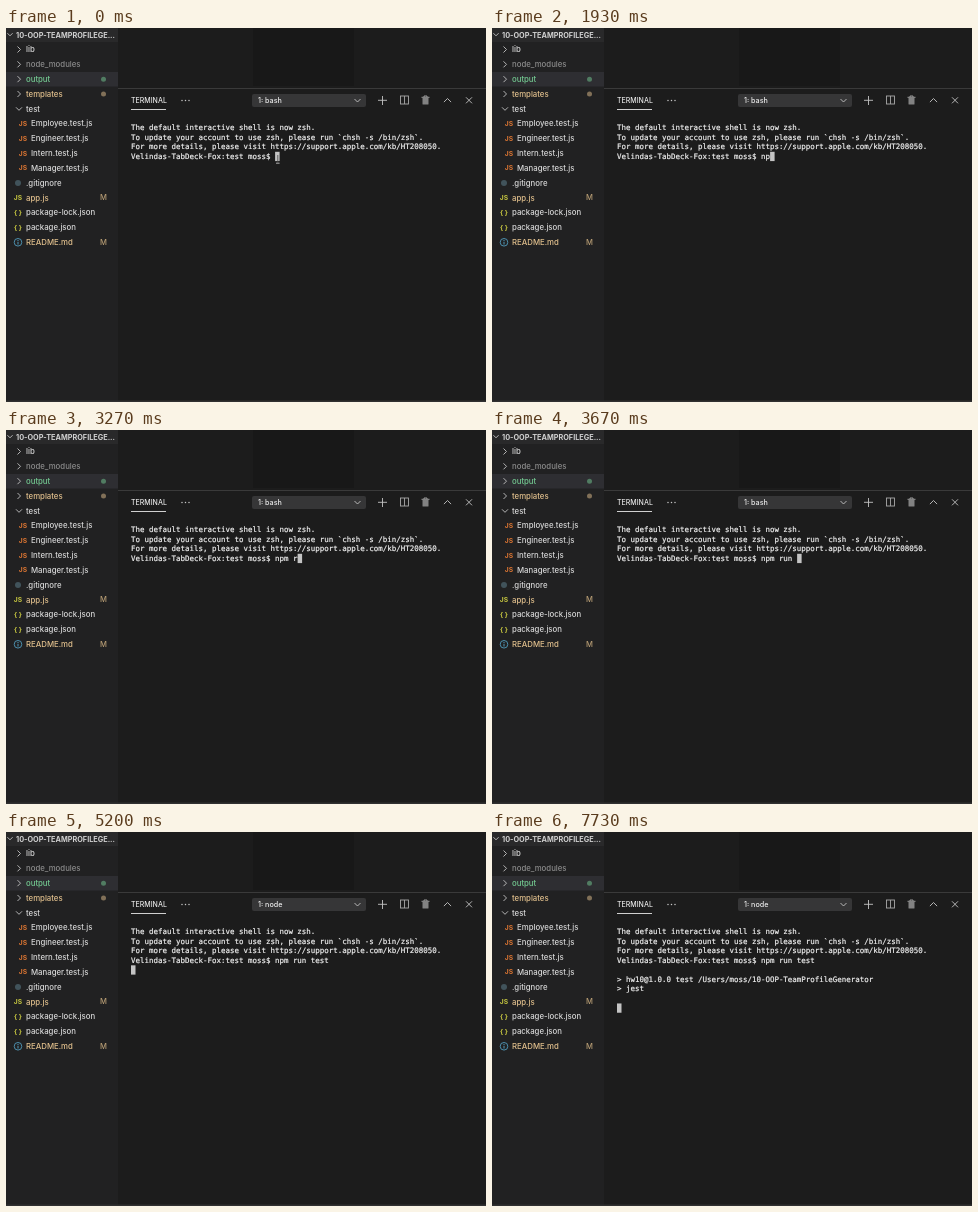
Recreate the animation shown at these times as an HTML page with a canvas. Size 480 by 374 pixels, loop 8 s.

```html
<!DOCTYPE html>
<html lang="en">
<head>
<meta charset="utf-8">
<title>Editor terminal</title>
<style>
html, body { margin: 0; width: 100%; height: 100%; overflow: hidden; background: #1c1c1c; }
canvas { display: block; width: 480px; height: 374px; }
</style>
</head>
<body>
<canvas id="stage" width="480" height="374"></canvas>
<script>
const ctx = document.getElementById('stage').getContext('2d');
const LOOP = 8000;
const UI = 'Inter, sans-serif';
const MONO = '7.48px "DejaVu Sans Mono", monospace';
const CELL = 4.503, LINE = 9.53, TERM_X = 125, TERM_Y = 95.2;

const GREEN = '#73c991', SAND = '#e2c08d', ORANGE = '#e37933', YELLOW = '#cbcb41';
const PLAIN = '#d8d8d8', GREY = '#8c8c8c';

const COMMAND = 'npm run test';
const KEY_TIMES = [1270, 1870, 2270, 3000, 3270, 3470, 3530, 3670, 3870, 4070, 4270, 4330];
const ENTER = 5130, SWITCH = 5200, OUTPUT = 6070;
const BANNER = [
  'The default interactive shell is now zsh.',
  'To update your account to use zsh, please run `chsh -s /bin/zsh`.',
  'For more details, please visit https://support.apple.com/kb/HT208050.'
];
const PROMPT = 'Velindas-TabDeck-Fox:test moss$ ';
const RESULT = ['> hw10@1.0.0 test /Users/moss/10-OOP-TeamProfileGenerator', '> jest'];

// name, colour, icon, icon colour, status mark, indent
const FILES = [
  ['lib', PLAIN, 'closed'],
  ['node_modules', GREY, 'closed'],
  ['output', GREEN, 'closed', '', 'dot'],
  ['templates', SAND, 'closed', '', 'dot'],
  ['test', PLAIN, 'open'],
  ...['Employee', 'Engineer', 'Intern', 'Manager'].map(n => [n + '.test.js', PLAIN, 'JS', ORANGE, '', 5]),
  ['.gitignore', PLAIN, 'disc', '#41535b'],
  ['app.js', SAND, 'JS', YELLOW, 'M'],
  ['package-lock.json', PLAIN, '{ }', YELLOW],
  ['package.json', PLAIN, '{ }', YELLOW],
  ['README.md', SAND, 'info', '#519aba', 'M']
];

function rect(x, y, w, h, color, radius = 0) {
  ctx.fillStyle = color;
  ctx.beginPath();
  ctx.roundRect(x, y, w, h, radius);
  ctx.fill();
}

function text(str, x, y, color, font) {
  ctx.font = font;
  ctx.fillStyle = color;
  ctx.fillText(str, x, y);
}

function disc(x, y, r, color) {
  ctx.fillStyle = color;
  ctx.beginPath();
  ctx.arc(x, y, r, 0, Math.PI * 2);
  ctx.fill();
}

function line(points, color, width = 0.9) {
  ctx.strokeStyle = color;
  ctx.lineWidth = width;
  ctx.beginPath();
  points.forEach(([x, y]) => ctx.lineTo(x, y));
  ctx.stroke();
}

function chevron(x, y, size, turn, color = '#c5c5c5') {
  ctx.save();
  ctx.translate(x, y);
  ctx.rotate(turn * Math.PI / 2);
  line([[-size / 2, -size], [size / 2, 0], [-size / 2, size]], color);
  ctx.restore();
}

function fileIcon(icon, color, x, y) {
  if (icon === 'closed') chevron(x + 1, y, 3, 0);
  else if (icon === 'open') chevron(x + 1, y, 3, 1);
  else if (icon === 'disc') disc(x, y, 3, color);
  else if (icon === 'info') {
    ctx.strokeStyle = color;
    ctx.lineWidth = 0.9;
    ctx.beginPath();
    ctx.arc(x, y, 3.8, 0, Math.PI * 2);
    ctx.stroke();
    rect(x - 0.5, y - 0.6, 1, 2.8, color);
    rect(x - 0.5, y - 2.2, 1, 1, color);
  } else {
    ctx.textAlign = 'center';
    text(icon, x, y + 2.3, color, `700 6.7px ${UI}`);
    ctx.textAlign = 'left';
  }
}

function drawSidebar() {
  rect(0, 0, 112, 374, '#212122');
  rect(0, 0, 112, 14, '#29292a');
  rect(0, 44, 112, 14.5, '#2e2e32');
  chevron(4, 6.5, 2.6, 1);
  text('10-OOP-TEAMPROFILEGE...', 10, 9.6, '#d0d0d0', `700 7.3px ${UI}`);

  FILES.forEach(([name, color, icon, iconColor, mark, indent = 0], i) => {
    const y = 21.5 + 14.83 * i;
    fileIcon(icon, iconColor, 12 + indent, y);
    text(name, 20 + indent, y + 2.8, color, `500 7.8px ${UI}`);
    if (mark === 'dot') {
      ctx.globalAlpha = 0.5;
      disc(97.5, y, 2.5, color);
      ctx.globalAlpha = 1;
    } else if (mark) text(mark, 94, y + 2.6, '#b59b73', `500 7.6px ${UI}`);
  });
}

function drawPanelBar(shell) {
  const icon = '#c5c5c5', soft = '#a8a8a8';
  rect(112, 60, 368, 1, '#3a3a3a');
  text('TERMINAL', 125, 75.2, '#e7e7e7', `500 7px ${UI}`);
  rect(125, 81, 35, 1, '#d0d0d0');
  [176, 179.5, 183].forEach(x => disc(x, 72.5, 0.75, icon));

  rect(246, 66, 114, 13, '#363637', 2);
  text('1: ' + shell, 252, 75.1, '#eeeeee', `500 7.2px ${UI}`);
  chevron(351.5, 72.5, 3, 1);

  line([[372, 72.3], [381, 72.3]], icon);
  line([[376.5, 68], [376.5, 77]], icon);

  ctx.strokeStyle = soft;
  ctx.lineWidth = 0.9;
  ctx.strokeRect(394.5, 68, 8, 8);
  line([[398.5, 68], [398.5, 76]], soft);

  line([[415.5, 69.3], [423.5, 69.3]], soft);
  line([[418, 69.3], [418, 68], [421, 68], [421, 69.3]], soft);
  rect(416.5, 69.5, 6, 7, '#828282', 0.5);

  chevron(441.5, 72.3, 3.6, -1);
  line([[460, 69.3], [466, 75.3]], icon);
  line([[466, 69.3], [460, 75.3]], icon);
}

function termLine(str, row) {
  const y = TERM_Y + row * LINE + 7;
  text(str, TERM_X, y, '#f0f0f0', MONO);
  // A hairline outline gives the heavier smoothing of a desktop terminal.
  ctx.strokeStyle = '#f0f0f0';
  ctx.lineWidth = 0.2;
  ctx.strokeText(str, TERM_X, y);
}

function cursor(col, row) {
  rect(TERM_X + col * CELL, TERM_Y + row * LINE, CELL, 9.3, '#c4c4c4');
}

function drawTerminal(t) {
  const typed = KEY_TIMES.filter(k => t >= k).length;
  BANNER.forEach(termLine);
  termLine(PROMPT + COMMAND.slice(0, typed), 3);

  if (t >= OUTPUT) {
    RESULT.forEach((str, i) => termLine(str, 5 + i));
    cursor(0, 8);
  } else if (t >= ENTER) cursor(0, 4);
  else cursor(PROMPT.length + typed, 3);

  // The text pointer hides at the first key press.
  if (!typed) {
    line([[271.8, 127], [271.8, 135]], '#444444', 0.8);
    line([[270, 135.2], [273.6, 135.2]], '#d0d0d0', 0.8);
  }
}

function draw(t) {
  rect(0, 0, 480, 374, '#1c1c1c');
  rect(247, -43, 101, 101, '#181818');
  drawSidebar();
  drawPanelBar(t >= SWITCH ? 'node' : 'bash');
  drawTerminal(t);
  rect(0, 372.5, 480, 1.5, '#303031');
}

const start = performance.now();
function tick() {
  draw((performance.now() - start) % LOOP);
  requestAnimationFrame(tick);
}
tick();
</script>
</body>
</html>
```
